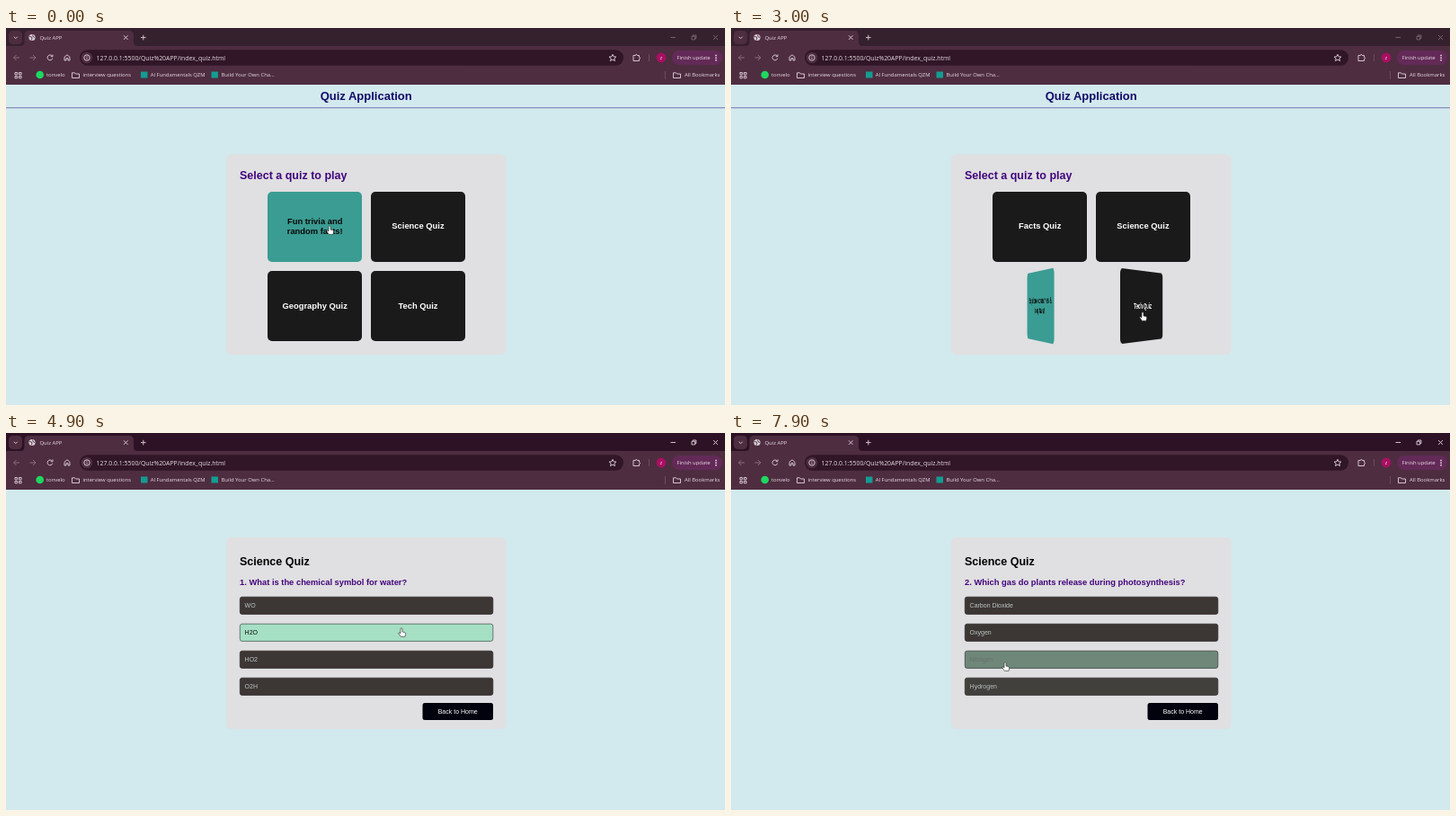
An HTML page that plays this animation: 800x419 px, repeating every 8 s.

```html
<!DOCTYPE html>
<html lang="en">
<head>
<meta charset="utf-8">
<title>Quiz APP</title>
<style>
  html, body { margin: 0; width: 100%; height: 100%; overflow: hidden; background: #d2e9ed; }
  svg { position: absolute; left: 0; top: 0; }
  text { white-space: pre; }
  .ui { font: 5.9px "Open Sans", "Noto Sans", sans-serif; fill: #e9dce4; }
  .page, .card { font-family: "Liberation Sans", Arial, sans-serif; }
  .b { font-weight: bold; }
  .icon { fill: none; stroke: #e3d3dd; stroke-width: .9; }
  .card {
    position: absolute; width: 104.6px; height: 78.2px; border-radius: 5px;
    display: flex; align-items: center; justify-content: center; text-align: center;
    white-space: pre; font-weight: bold; font-size: 9.375px; line-height: 11px;
  }
</style>
</head>
<body>
<svg width="800" height="419" viewBox="0 0 800 419">
  <g id="browser">
    <rect id="strip" width="800" height="24"/>
    <path d="M0 20H16Q20.500 20 20.500 15.500V8Q20.500 3 25.500 3H137Q142 3 142 8V15.500Q142 20 146.500 20H800V63H0Z" fill="#4e2d40"/>
    <rect x="3" y="3" width="15" height="15" rx="4.500" fill="#4e2d40"/>
    <path class="icon" d="M8.800 9.700l2 2 2-2"/>
    <circle cx="29" cy="10.500" r="3.600" fill="#d9d0d5"/>
    <path d="M26 9.500l2.500.5.5 2-1 1.500M29.500 7.500l.5 2 2 1" fill="none" stroke="#4e2d40" stroke-width=".9"/>
    <text class="ui" x="37.500" y="12.700">Quiz APP</text>
    <path class="icon" d="M131 8.300l4.600 4.600m0-4.600l-4.600 4.600M150 10.600h5.600m-2.800-2.800v5.600"/>
    <g id="controls" class="icon">
      <path d="M739.500 10.500h5.500M787 8l5 5m0-5l-5 5"/>
      <path d="M763 9.300h3.600v3.600H763zM764.300 9V8h3.600v3.600h-1"/>
    </g>
    <g class="icon">
      <path d="M15 33H8.500m3-3l-3 3 3 3M26.500 33H33m-3-3l3 3-3 3" stroke="#90747f"/>
      <path d="M51.300 31.100a2.900 2.900 0 1 0 .5 2.600M52 29.500v2.200h-2.200"/>
      <path d="M65 32.300l3-2.500 3 2.500V36H69v-2.400h-2V36h-2z"/>
      <path d="M10 49.500h2.600v2.300H10zM14.500 49.500h2.600v2.300h-2.600zM10 53.500h2.600v2.300H10zM14.500 53.500h2.600v2.300h-2.600z"/>
      <path id="folder" d="M73.500 49.800h3l1 1.200h4v4.500h-8z"/>
      <use href="#folder" x="669"/>
      <path d="M698 30.500h2.300a1 1 0 0 1 2 0h2.200v2a1 1 0 0 1 0 2v2H698z"/>
      <path d="M715.500 29v8M733.500 48v9" stroke="#7b5a6d" stroke-width=".7"/>
    </g>
    <rect x="82" y="24.300" width="605" height="17.400" rx="8.700" fill="#301627"/>
    <circle cx="90" cy="33" r="6.300" fill="#4e2d40"/>
    <circle class="icon" cx="90" cy="33" r="3.200"/>
    <path class="icon" d="M90 31v.8M90 32.700v2"/>
    <text class="ui" x="100.500" y="35.600" style="font-size:6.920px">127.0.0.1:5500/Quiz%20APP/index_quiz.html</text>
    <path class="icon" d="M675 29.300l1.100 2.500 2.800.3-2.100 1.800.7 2.700-2.500-1.500-2.500 1.500.7-2.700-2.100-1.800 2.800-.3z" stroke-width=".7"/>
    <circle cx="729" cy="33" r="5.400" fill="#a80f62"/>
    <text class="ui" x="729" y="35" text-anchor="middle">z</text>
    <rect x="741" y="25" width="56" height="16" rx="8" fill="#632a58"/>
    <text class="ui" x="746.500" y="35.200">Finish update</text>
    <path d="M790 29.700v7" stroke="#eee" stroke-width="1.500" stroke-dasharray="1.500 1.200"/>
    <circle cx="37.700" cy="52" r="4.300" fill="#1ed760"/>
    <text class="ui" x="45" y="54.300">tonvelo</text>
    <text class="ui" x="85.500" y="54.300">interview questions</text>
    <rect x="150" y="48.500" width="7.500" height="7" fill="#149c92"/>
    <text class="ui" x="160.700" y="54.300">AI Fundamentals QZM</text>
    <rect x="228.500" y="48.500" width="7.500" height="7" fill="#149c92"/>
    <text class="ui" x="239.500" y="54.300">Build Your Own Cha...</text>
    <text class="ui" x="755" y="54.300">All Bookmarks</text>
  </g>

  <g id="menu" class="page">
    <text class="b" x="400.700" y="80" font-size="13" text-anchor="middle" fill="#130a68">Quiz Application</text>
    <path d="M0 88.700H800" stroke="#7a78b0" stroke-width="1"/>
    <rect x="245" y="140.500" width="311.500" height="222.500" rx="6" fill="#e0dfe1"/>
    <text class="b" x="260" y="168" font-size="12.500" fill="#3f067c">Select a quiz to play</text>
  </g>

  <g id="quiz" class="page">
    <rect id="panel" x="245" y="116" width="311.500" rx="6" fill="#e0dfe1"/>
    <text class="b" x="260" y="147.300" font-size="12.500">Science Quiz</text>
    <text id="question" class="b" x="260" y="169" font-size="9.375" fill="#42057d"></text>
    <g id="options" font-size="7"></g>
    <g id="next" font-size="7" text-anchor="middle">
      <rect x="361.500" y="314" width="78.500" height="18.500" rx="2.500" fill="#140a63"/>
      <text x="400.800" y="325.500" fill="#fff">Next Question</text>
    </g>
    <g id="back" font-size="7" text-anchor="middle">
      <rect x="463.500" y="300" width="78.500" height="19" rx="2.500" fill="#02020f"/>
      <text x="502.700" y="312" fill="#fff">Back to Home</text>
    </g>
  </g>
</svg>
<div id="cards"></div>
<svg width="800" height="419" viewBox="0 0 800 419">
  <path id="hand" d="M-1 .8a1 1 0 0 1 2 0V4l2.600.6q1.200.4 1 1.600l-.6 3.200h-4.600l-2.600-3.600q-.2-1 .8-.9l1.400.9z"
    fill="#fff" stroke="#222" stroke-width=".6" stroke-linejoin="round"/>
</svg>

<script>
const LOOP = 8000, STEP = 100;
const FOCUS = 4400, OPEN_QUIZ = 4600, ANSWER = 5700, NEXT = 7000;
const FLIP_MS = 600, FADE_MS = 300;
const $ = id => document.getElementById(id);
const clamp = v => Math.min(1, Math.max(0, v));

// CSS "ease" timing: cubic-bezier(.25, .1, .25, 1)
function ease(p) {
  p = clamp(p);
  const bez = (a, b, s) => 3 * s * (1 - s) ** 2 * a + 3 * s * s * (1 - s) * b + s ** 3;
  let lo = 0, hi = 1;
  for (let i = 0; i < 24; i++) {
    const mid = (lo + hi) / 2;
    if (bez(.25, .25, mid) < p) lo = mid; else hi = mid;
  }
  return bez(.1, 1, lo);
}

// Progress of a transition driven by hover intervals [enter, leave]
const hover = (t, spans, ms) => spans.reduce(
  (sum, [enter, leave]) => sum + ease((t - enter) / ms) - ease((t - leave) / ms), 0);

function mix(a, b, k) {
  return `rgb(${a.map((v, i) => Math.round(v + (b[i] - v) * k))})`;
}

const cards = [
  { front: "Facts Quiz", back: "Fun trivia and\nrandom facts!", spans: [[-FLIP_MS, 900]] },
  { front: "Science Quiz", back: "Test your science\nknowledge!", spans: [[920, 2080], [3700, LOOP]] },
  { front: "Geography Quiz", back: "Explore countries &\ncapitals!", spans: [[2200, 2850]] },
  { front: "Tech Quiz", back: "All about technology\ntrends!", spans: [[2865, 3700]] }
];
cards.forEach((card, i) => {
  card.el = document.createElement("div");
  card.el.className = "card";
  card.el.style.left = 291.4 + i % 2 * 114.8 + "px";
  card.el.style.top = (i < 2 ? 181.5 : 270) + "px";
  $("cards").append(card.el);
});

function drawCards(t) {
  for (const { el, front, back, spans } of cards) {
    const angle = 180 * hover(t, spans, FLIP_MS);
    const flipped = angle > 90;
    const label = flipped ? back : front;
    if (el.textContent !== label) el.textContent = label;
    el.style.background = flipped ? "#3a9c92" : "#1a1a1a";
    el.style.color = flipped ? "#080808" : "#fff";
    const turn = flipped ? angle - 180 : angle;
    el.style.transform = Math.abs(turn) < .01 ? "none" : `perspective(625px) rotateY(${turn}deg)`;
  }
}

const questions = [
  { title: "1. What is the chemical symbol for water?", answers: ["WO", "H2O", "HO2", "O2H"],
    spans: [[], [[OPEN_QUIZ, LOOP]], [], []] },
  { title: "2. Which gas do plants release during photosynthesis?",
    answers: ["Carbon Dioxide", "Oxygen", "Nitrogen", "Hydrogen"],
    spans: [[], [], [[7815, LOOP]], [[7540, 7690]]] }
];
const DARK = [60, 54, 52], MINT = [165, 223, 196], GREEN = [138, 238, 134];
const PALE = [191, 201, 198], INK = [10, 14, 12];

function svg(tag, attrs) {
  const el = document.createElementNS("http://www.w3.org/2000/svg", tag);
  for (const key in attrs) el.setAttribute(key, attrs[key]);
  $("options").append(el);
  return el;
}
const options = [0, 1, 2, 3].map(i => ({
  box: svg("rect", { x: 260.3, y: 182.2 + 30 * i, width: 281.5, height: 19.2, rx: 2.5, "stroke-width": .7 }),
  label: svg("text", { x: 265.6, y: 194.1 + 30 * i })
}));

function drawQuiz(t) {
  const second = t >= NEXT, answered = t >= ANSWER && !second;
  const { title, answers, spans } = questions[+second];
  $("question").textContent = title;
  $("panel").setAttribute("height", answered ? 242 : 213);
  $("next").style.display = answered ? "" : "none";
  $("back").setAttribute("transform", `translate(0 ${answered ? 29.3 : 0})`);
  options.forEach(({ box, label }, i) => {
    const k = hover(t, spans[i], FADE_MS);
    const right = answered && i === 1;
    box.setAttribute("fill", right ? mix(MINT, GREEN, ease((t - ANSWER) / FADE_MS)) : mix(DARK, MINT, k));
    box.setAttribute("stroke", mix([44, 40, 39], [58, 78, 66], k));
    label.setAttribute("fill", mix(PALE, INK, k));
    label.textContent = answers[i];
  });
}

// Fingertip positions: time, x, y
const path = [
  [0, 360, 220], [650, 362, 222], [1150, 462, 226], [1900, 465, 228], [2350, 350, 312],
  [2700, 360, 316], [3000, 458, 316], [3500, 458, 312], [3800, 452.500, 219], [4600, 448, 218],
  [4900, 440, 217], [5500, 365, 220], [6200, 365, 220], [6700, 400, 320], [7250, 400, 314],
  [7900, 305, 255], [LOOP, 305, 255]
];
function drawHand(t) {
  const i = path.findIndex(p => p[0] > t);
  const [t0, x0, y0] = path[i - 1], [t1, x1, y1] = path[i];
  const p = (t - t0) / (t1 - t0), k = p * p * (3 - 2 * p);
  $("hand").setAttribute("transform", `translate(${x0 + (x1 - x0) * k} ${y0 + (y1 - y0) * k})`);
}

function draw(t) {
  const focused = t >= FOCUS, inQuiz = t >= OPEN_QUIZ;
  $("strip").setAttribute("fill", focused ? "#2c1224" : "#35202e");
  $("controls").setAttribute("opacity", focused ? 1 : .4);
  $("menu").style.display = $("cards").style.display = inQuiz ? "none" : "";
  $("quiz").style.display = inQuiz ? "" : "none";
  if (inQuiz) drawQuiz(t); else drawCards(t);
  drawHand(t);
}

function tick() {
  const t = performance.now() % LOOP;
  draw(Math.floor(t / STEP) * STEP);
  requestAnimationFrame(tick);
}
tick();
</script>
</body>
</html>
```
